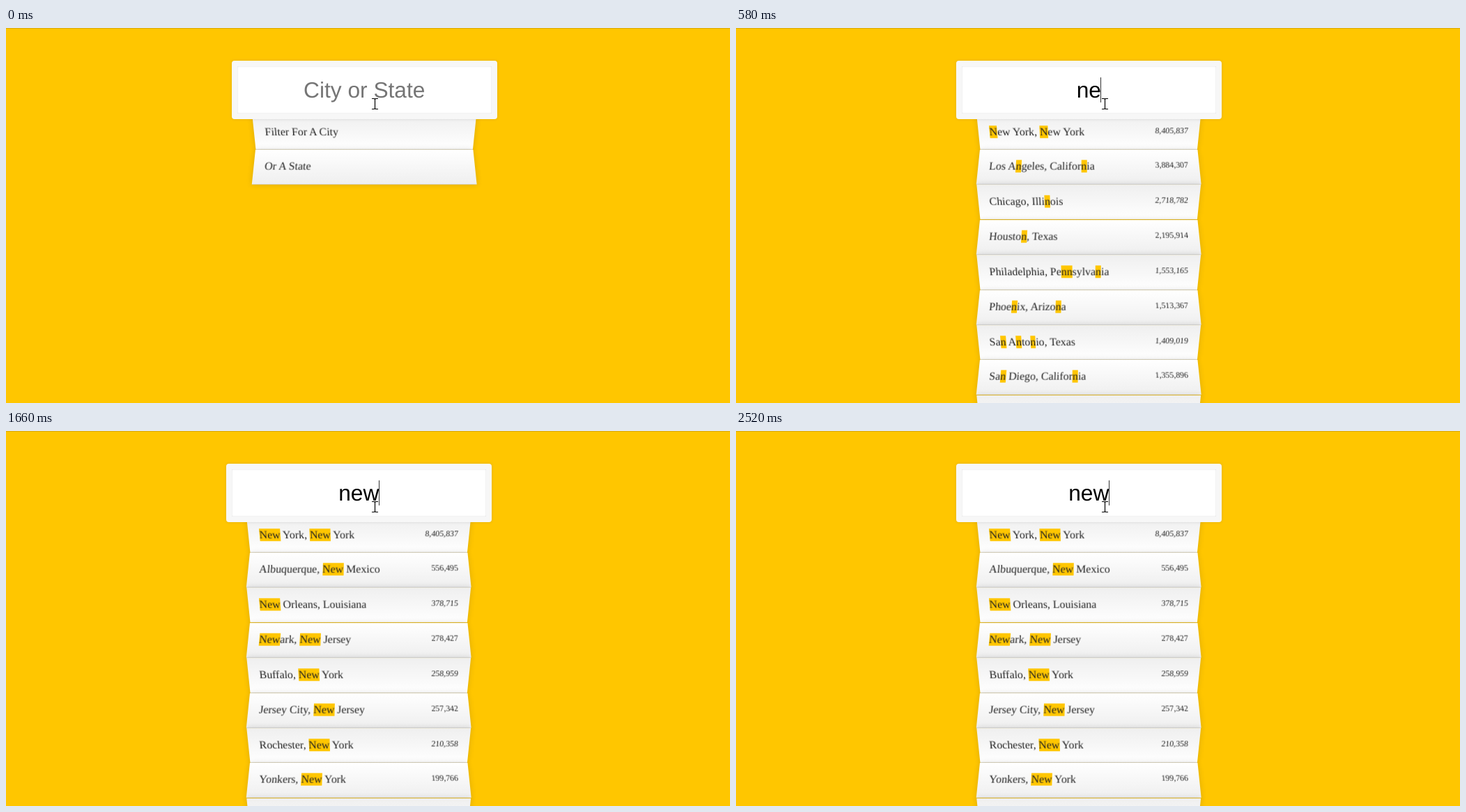
An HTML page that plays this animation: 1039x539 px, repeating every 2590 ms.

```html
<!DOCTYPE html>
<html lang="en">
<head>
<meta charset="utf-8">
<title>City or state search</title>
<style>
  html, body { margin: 0; width: 100%; height: 100%; overflow: hidden; background: #ffc600; }
  * { box-sizing: border-box; }
  #stage { position: fixed; inset: 0; overflow: hidden; text-rendering: geometricPrecision; }
  #topline { position: absolute; left: 0; top: 0; width: 100%; height: 1px; background: #d9a90c; }
  ul { margin: 0; padding: 0; list-style: none; }
  li {
    position: absolute; left: 0; top: 0; width: 317.1px; padding: 15.86px;
    display: flex; justify-content: space-between; white-space: nowrap;
    font: 15.86px/17.7px "Liberation Serif", "Times New Roman", serif; color: #222;
    border-bottom: 1px solid #d8d8d8; box-shadow: 0 0 8px rgba(0, 0, 0, .14);
    transform-origin: 50% 25.2px;
  }
  li:nth-child(odd) { background: linear-gradient(to top, #fff, #efefef); }
  li:nth-child(even) { background: linear-gradient(to bottom, #fff, #efefef); }
  /* The page shows through at the fold of every fifth row. */
  li:nth-child(5n+3) { border-bottom-color: #e3b824; }
  .population { font-size: 11.89px; line-height: 13.5px; }
  .hl { background: #ffc600; padding: .5px 0; }
  #search {
    position: absolute; top: 47px; width: 380.5px; height: 84px;
    border: 8px solid #f7f7f7; border-radius: 4px; background: #fff;
    box-shadow: 0 0 4px rgba(0, 0, 0, .12), inset 0 0 2px rgba(0, 0, 0, .19);
    font: 31.7px/36px "Liberation Sans", Arial, sans-serif; text-align: center; padding: 16px 0;
  }
  #caret { position: absolute; top: 71px; width: 1px; height: 36px; }
  #pointer { position: absolute; left: 0; top: 0; }
</style>
</head>
<body>
<div id="stage">
  <div id="topline"></div>
  <ul id="list"></ul>
  <div id="search"></div>
  <div id="caret"></div>
  <svg id="pointer" width="1039" height="539" fill="none">
    <defs><path id="beam" d="M525 101.5h3.5l1 1l1-1h3.5M529.5 102v14M525 116.5h3.5l1-1l1 1h3.5"/></defs>
    <use href="#beam" stroke="#fff" stroke-width="2.6"/>
    <use href="#beam" stroke="#000" stroke-width="1.2"/>
  </svg>
</div>
<script>
const LOOP = 2590;

// Each list: search term, then "place|population" rows.
const lists = {
  hint: ['', 'Filter For A City', 'Or A State'],
  n: ['n', 'New York, New York|8,405,837', 'Los Angeles, California|3,884,307',
    'Chicago, Illinois|2,718,782', 'Houston, Texas|2,195,914',
    'Philadelphia, Pennsylvania|1,553,165', 'Phoenix, Arizona|1,513,367',
    'San Antonio, Texas|1,409,019', 'San Diego, California|1,355,896', ''],
  ne: ['ne', 'New York, New York|8,405,837', 'Memphis, Tennessee|653,450',
    'Nashville-Davidson, Tennessee|634,464', 'Las Vegas, Nevada|603,488',
    'Albuquerque, New Mexico|556,495', 'Omaha, Nebraska|434,353',
    'Minneapolis, Minnesota|400,070', 'New Orleans, Louisiana|378,715', ''],
  new: ['new', 'New York, New York|8,405,837', 'Albuquerque, New Mexico|556,495',
    'New Orleans, Louisiana|378,715', 'Newark, New Jersey|278,427',
    'Buffalo, New York|258,959', 'Jersey City, New Jersey|257,342',
    'Rochester, New York|210,358', 'Yonkers, New York|199,766', '']
};

const steps = [
  { at: 0, typed: '', list: 'hint' },
  { at: 120, typed: 'n', list: 'hint', caret: 523 },
  { at: 580, typed: 'ne', list: 'n', caret: 523 },
  { at: 860, typed: 'ne', list: 'ne', caret: 523 },
  { at: 1120, typed: 'ne', list: 'ne' },
  { at: 1450, typed: 'new', list: 'ne', caret: 535 },
  { at: 1660, typed: 'new', list: 'new', caret: 535 },
  { at: 1990, typed: 'new', list: 'new' },
  { at: 2520, typed: 'new', list: 'new', caret: 535 }
];

const el = id => document.getElementById(id);
const list = el('list'), search = el('search'), caret = el('caret');
const rowTop = i => Math.round(122.6 + 50.4 * i);

function rowHtml(row, i, term, x) {
  const [place, population = ''] = row.split('|');
  const name = term ? place.replace(new RegExp(term, 'gi'), '<span class="hl">$&</span>') : place;
  const fold = i % 2 ? 'rotateX(3deg) translateY(1.59px) scale(1.001)'
                     : 'rotateX(-3deg) translateY(2.38px)';
  const style = `height: ${rowTop(i + 1) - rowTop(i)}px;
    transform: translate(${x}px, ${rowTop(i)}px) perspective(79.3px) ${fold}`;
  return `<li style="${style}"><span>${name}</span><span class="population">${population}</span></li>`;
}

function show(step) {
  const hint = step.list === 'hint';
  const left = hint ? 324 : 316;
  const [term, ...rows] = lists[step.list];
  list.innerHTML = rows.map((row, i) => rowHtml(row, i, term, left + 31.7)).join('');
  search.style.left = left + 'px';
  search.textContent = step.typed || 'City or State';
  search.style.color = step.typed ? '#000' : '#757575';
  caret.style.display = step.caret ? 'block' : 'none';
  caret.style.left = step.caret + 'px';
  caret.style.background = hint ? '#000' : '#333';
}

const start = performance.now();
let current;
function tick() {
  const t = (performance.now() - start) % LOOP;
  const step = steps.findLast(s => s.at <= t) || steps[0];
  if (step !== current) show(current = step);
  requestAnimationFrame(tick);
}
tick();
</script>
</body>
</html>
```
